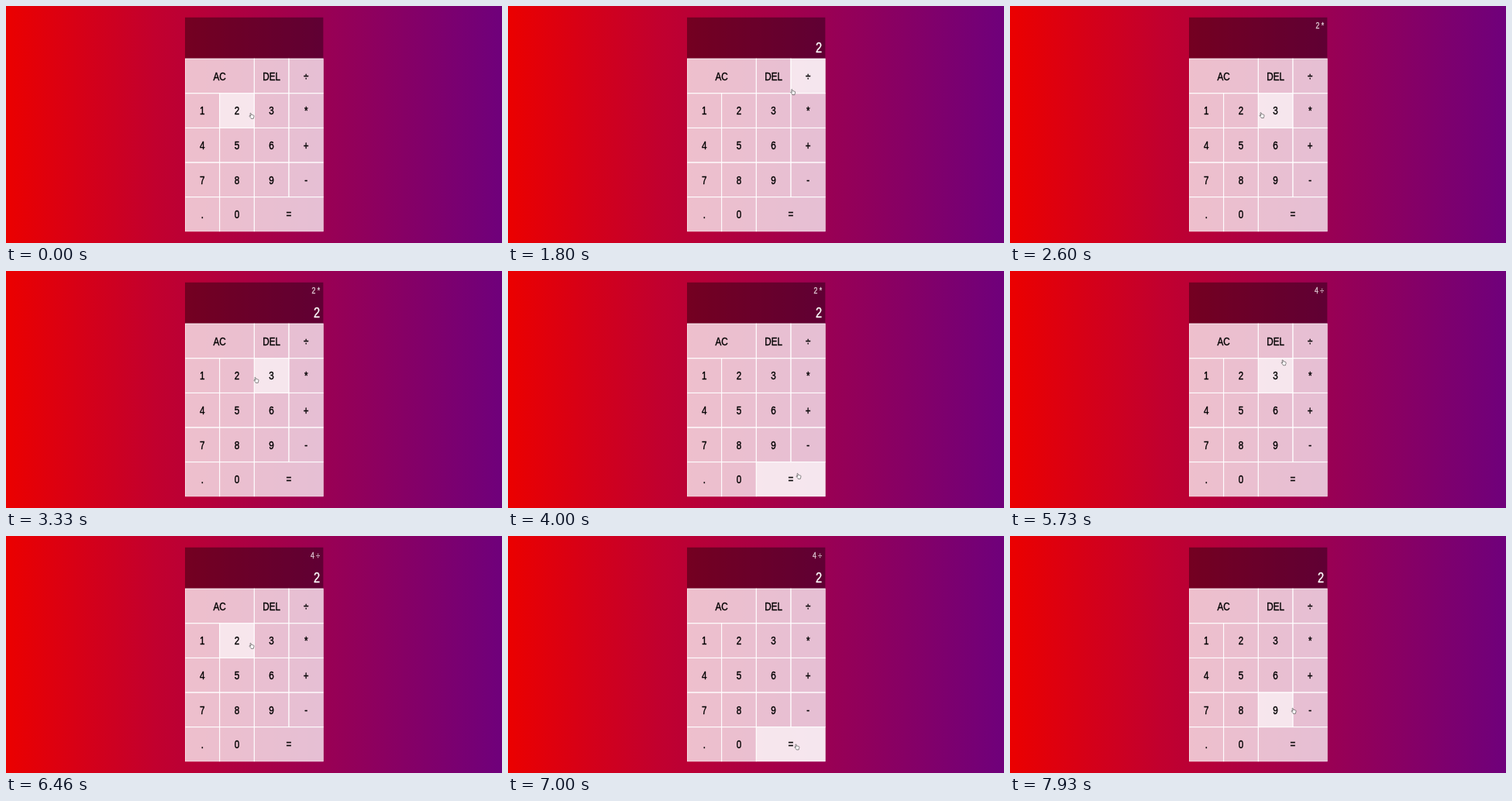
Animation of 640 by 306 pixels, one loop 8000 ms. Source, as an HTML page:

```html
<!DOCTYPE html>
<html lang="en">
<head>
<meta charset="utf-8">
<title>Calculator</title>
<style>
  html, body { margin: 0; width: 100%; height: 100%; overflow: hidden; }
  body { background: linear-gradient(to right, #eb0000, #c2002e 30%, #6f007b); }
  body > svg { display: block; width: 640px; height: 306px; }
  text { font-family: "Liberation Sans", Arial, sans-serif; }
  .key rect { fill: #fff; fill-opacity: .75; stroke: #fff; stroke-width: 2; }
  .key.hover rect { fill-opacity: .9; }
  .key text { font-size: 32px; text-anchor: middle; stroke: #000; stroke-width: .9; }
  .screen { fill: #000; fill-opacity: .38; }
  #prev, #cur { fill: #fff; stroke: #fff; stroke-width: .8; text-anchor: end; }
  #prev { font-size: 24px; opacity: .8; }
  #cur { font-size: 40px; }
  #hand { fill: #fff; stroke: #222; stroke-width: 1.2; stroke-linejoin: round; }
</style>
</head>
<body>
<svg viewBox="0 0 640 306">
  <svg id="calc" x="231" y="14.5" width="178.6" height="276.8" viewBox="0 0 400 620">
    <rect class="screen" width="400" height="120"/>
    <text id="prev" transform="translate(390 32) scale(.82 1)"></text>
    <text id="cur" transform="translate(390 101.5) scale(.82 1)"></text>
  </svg>
  <g id="hand">
    <path transform="scale(.45) translate(-8 -9)" d="M5 9 L3.6 3 Q3.4 1.2 4.8 1 Q6 1 6.4 2.6 L7.4 6 Q8.6 5 9.8 6.2 Q11 5.6 12 6.8 Q14 6.4 14.4 8.4 Q15 11 13.6 13.6 L13 16.5 H6.6 L6 15 Q3.4 12.4 1.6 9.8 Q1 8.2 2.6 8 Q4 8.2 5 10 Z"/>
  </g>
</svg>
<script>
const LOOP = 8000, STEP = 1000 / 15;
const LEFT = 231, TOP = 14.5, SCALE = 178.6 / 400;
const byId = id => document.getElementById(id);

function add(parent, name, attrs) {
  const el = document.createElementNS("http://www.w3.org/2000/svg", name);
  for (const k in attrs) el.setAttribute(k, attrs[k]);
  return parent.appendChild(el);
}

// AC and = are two columns wide
const keys = [];
["AC DEL ÷", "1 2 3 *", "4 5 6 +", "7 8 9 -", ". 0 ="].forEach((row, r) => {
  let x = 0;
  const y = 120 + r * 100;
  for (const label of row.split(" ")) {
    const w = label === "AC" || label === "=" ? 200 : 100;
    const el = add(byId("calc"), "g", { class: "key" });
    add(el, "rect", { x, y, width: w, height: 100 });
    add(el, "text", { transform: `translate(${x + w / 2} ${y + 62}) scale(.82 1)` }).textContent = label;
    keys.push({ el, x, y, w });
    x += w;
  }
});

// Where the pointer rests on each key it visits
const spots = { "2": [317, 142], "*": [389, 135], "=": [375, 265], "÷": [389, 95], "9": [366.1, 226] };

const moves = [
  { at: 1600, time: 600, to: "*", bow: [0, -31] },
  { at: 2460, time: 270, to: "2", bow: [0, 0] },
  { at: 3312, time: 600, to: "=", bow: [0, -37] },
  { at: 4700, time: 850, to: "÷", bow: [28, 0] },
  { at: 5600, time: 650, to: "2", bow: [0, 0] },
  { at: 6480, time: 780, to: "=", bow: [0, 85] },
  { at: 7400, time: 530, to: "9", bow: [0, 0] }
];

const presses = [[1390, "2"], [2450, "*"], [2990, "2"], [4260, "="], [5590, "÷"], [6260, "2"], [7320, "="]];

// Each move eases out along an arc
function pointer(t) {
  let pos = spots["2"];
  for (const m of moves) {
    if (t < m.at) break;
    const e = 1 - (1 - Math.min(1, (t - m.at) / m.time)) ** 3;
    pos = pos.map((p, c) => p + (spots[m.to][c] - p) * e + m.bow[c] * 4 * e * (1 - e));
  }
  return pos;
}

function calculate(t) {
  let prev = "", op = "", cur = "";
  for (const [at, key] of presses) {
    if (at > t) break;
    if (key === "=") {
      cur = String(op === "*" ? prev * cur : prev / cur);
      prev = op = "";
    } else if (key === "*" || key === "÷") {
      [prev, op, cur] = [cur, key, ""];
    } else {
      cur += key;
    }
  }
  return [op && `${prev} ${op}`, cur];
}

function draw(now) {
  const t = Math.floor(((now % LOOP) + 8) / STEP) * STEP % LOOP;
  const [x, y] = pointer(t);
  byId("hand").setAttribute("transform", `translate(${x} ${y})`);

  const hx = (x - 1.6 - LEFT) / SCALE, hy = (y - 2 - TOP) / SCALE;
  for (const k of keys) {
    const over = hx >= k.x && hx < k.x + k.w && hy >= k.y && hy < k.y + 100;
    k.el.classList.toggle("hover", over);
  }

  [byId("prev").textContent, byId("cur").textContent] = calculate(t);
}

const start = performance.now();
function tick() {
  draw(performance.now() - start);
  requestAnimationFrame(tick);
}
tick();
</script>
</body>
</html>
```
